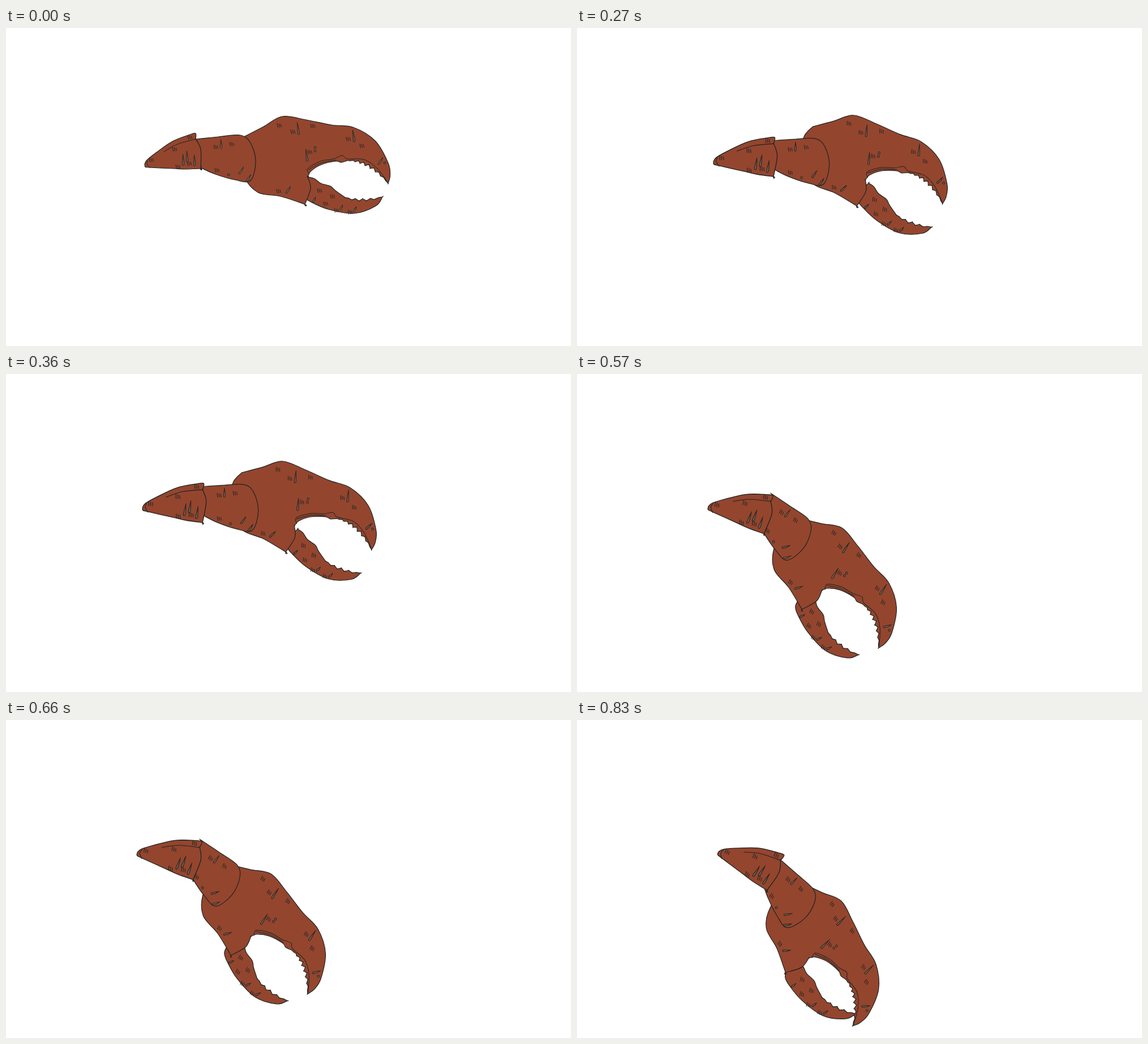
Write an HTML page with a canvas that moves like this. It is 998x561 px and loops after 900 ms.

```html
<!DOCTYPE html>
<html lang="en">
<head>
<meta charset="utf-8">
<title>Crab claw</title>
<style>
  html, body { margin: 0; width: 100%; height: 100%; overflow: hidden; background: #fff; }
  canvas { display: block; }
</style>
</head>
<body>
<canvas id="stage" width="998" height="561"></canvas>
<script>
const ctx = document.getElementById('stage').getContext('2d');
const SHELL = '#94452e', INK = '#1d2422', GLINT = '#84604a';
const LOOP = 900, FIRST_HOLD = 120, HOLD = 150, LAST_STEP = 5;

// Smooth path through points; a point given twice makes a corner.
function curve(points) {
  const path = new Path2D();
  const at = i => points[Math.max(0, Math.min(points.length - 1, i))];
  path.moveTo(...at(0));
  for (let i = 0; i < points.length - 1; i++) {
    const [a, b, c, d] = [at(i - 1), at(i), at(i + 1), at(i + 2)];
    path.bezierCurveTo(
      b[0] + (c[0] - a[0]) / 6, b[1] + (c[1] - a[1]) / 6,
      c[0] - (d[0] - b[0]) / 6, c[1] - (d[1] - b[1]) / 6, ...c);
  }
  return path;
}

const corner = (x, y) => [[x, y], [x, y]];

// Saw teeth along a quadratic arc from a to b, pointing into the mouth.
function teeth(a, control, b, count, depth) {
  const dx = b[0] - a[0], dy = b[1] - a[1], length = Math.hypot(dx, dy);
  const points = [];
  for (let i = 1; i < count * 2; i++) {
    const t = i / (count * 2);
    const out = (i % 2 ? depth : -depth / 3) * Math.sin(Math.PI * t);
    const on = k => (1 - t) ** 2 * a[k] + 2 * t * (1 - t) * control[k] + t * t * b[k];
    points.push(...corner(on(0) + out * dy / length, on(1) - out * dx / length));
  }
  return points;
}

// Short slanted strokes in a row.
function ticks([x, y]) {
  const path = new Path2D();
  for (const i of [-1, 0, 1]) {
    path.moveTo(x + i * 3 - 1, y - 3 + i / 2);
    path.lineTo(x + i * 3 + .5, y + 3 - i / 2);
  }
  return path;
}

// Thin drop, pointed at the top and round at the bottom.
function drop([x, y], size, lean) {
  const top = [x - lean, y - size / 2], bottom = [x + lean, y + size / 2];
  return curve([top, [x + 1, y], [bottom[0] + 1, bottom[1] - 2], bottom,
                [bottom[0] - 2, bottom[1] - 2], top, top]);
}

function ring([x, y]) {
  const path = new Path2D();
  path.arc(x, y, 1.8, 0, 7);
  return path;
}

// Back to front. Each pose is x, y and turn in degrees; the first pose is the drawn one.
const finger = {
  outline: [
    [522, 284], ...corner(534, 263), [545, 266], [556, 274], [573, 279], [582, 287],
    ...corner(599, 299), ...teeth([599, 299], [628, 310], [665, 298], 5, 3),
    ...corner(665, 298), [653, 314], [615, 327], [570, 320], [537, 306], [525, 297], [522, 284]],
  dropSize: 9, lean: -1.5,
  scars: [[593, 317], [617, 320]],
  drops: [[545, 303]],
  ticks: [[554, 287], [577, 297], [565, 310]],
  poses: [[595, 304, 0], [576, 310, 6.2], [558.5, 333, 20],
          [511.5, 400, 23.7], [437.5, 458, 37], [427, 492, 27]]
};

const palm = {
  outline: [
    [422, 191], [455, 174], [488, 156], [530, 162], [575, 171], [614, 175.5],
    [652, 199], [675, 238], [678.5, 260], ...corner(675, 274),
    ...teeth([675, 274], [642, 230], [603, 234], 8, 3.5),
    [603, 234], [592, 237], [583, 235], [557, 241], [538, 253], ...corner(533, 263),
    [538, 283], ...corner(528, 311), [485, 297], [445, 290], [420, 261], [410, 215], [422, 191]],
  lines: [
    [[536, 258], [533, 248], [556, 235], [578, 231], [594, 225], [603, 231],
     [632, 232], [655, 247], [674, 272]],
    [[534, 250], [557, 238], [583, 233]]],
  dropSize: 20, lean: 1.5,
  scars: [[516, 178], [614, 191]],
  drops: [[531, 225]],
  slants: [[499, 286], [662, 235]],
  ticks: [[483, 172], [542, 173], [629, 208], [537, 219], [482, 288]],
  rings: [[546, 211], [546, 217], [669, 238]],
  poses: [[567, 248, 0], [550, 242, 6.5], [546, 261, 12.6],
          [520, 336, 25.3], [468, 393, 40.8], [442, 438, 52.4]]
};

const middle = {
  outline: [
    ...corner(337, 196), [375, 192], [414, 189], [432, 203], [441, 235],
    [432, 269], [405, 268], [370, 258], ...corner(345, 247), [337, 196]],
  dropSize: 15, lean: .5,
  scars: [[380, 205]],
  slants: [[416, 252], [429, 265]],
  ticks: [[399, 205], [373, 251]],
  rings: [[393, 259]],
  poses: [[403.4, 237.4, 0], [411, 227, -10.3], [408, 243, 2.5],
          [386.4, 268, 24.2], [369, 286, 39.6], [375, 324, 47.1]]
};

const upper = {
  outline: [
    [245, 240], [249, 233], [265, 220], [294, 200], [325, 188], [335, 186], ...corner(335, 196),
    [344, 214], ...corner(344, 248), [318, 249], [296, 248], [253, 246], [246, 245], [245, 240]],
  lines: [
    [[279, 218], [303, 205], [335, 196]],
    [[250, 234], [249, 240], [255, 247]]],
  dropSize: 18, lean: .5,
  scars: [[333, 234]],
  drops: [[320, 227], [313, 233]],
  ticks: [[257, 233], [298, 214], [304, 245], [325, 193]],
  growth: 1.1,
  poses: [[312.5, 231, 0], [318.3, 225.3, 2.6], [316.3, 237.7, 10.1],
          [318.3, 246.3, 22.1], [305, 251.5, 21.7], [317.5, 265.5, 34.2]]
};

function paint(path, fill) {
  if (fill) {
    ctx.fillStyle = fill;
    ctx.fill(path);
  }
  ctx.stroke(path);
}

function drawPart(part, step) {
  const { lines = [], drops = [], slants = [], rings = [], scars, dropSize, lean } = part;
  const [pivotX, pivotY] = part.poses[0];
  const [x, y, degrees] = part.poses[step];
  const scale = step ? part.growth ?? 1 : 1;
  ctx.save();
  ctx.translate(x, y);
  ctx.rotate(degrees * Math.PI / 180);
  ctx.scale(scale, scale);
  ctx.translate(-pivotX, -pivotY);
  ctx.lineWidth = 1.2;
  paint(curve(part.outline), SHELL);
  ctx.lineWidth = 1;
  lines.forEach(line => paint(curve(line)));
  [...scars, ...drops].forEach(spot => paint(drop(spot, dropSize, lean), GLINT));
  slants.forEach(spot => paint(drop(spot, 12, -3), GLINT));
  // A scar is a drop with ticks at its side.
  const besideScars = scars.map(([sx, sy]) => [sx - 9, sy + 5]);
  [...part.ticks, ...besideScars].forEach(spot => paint(ticks(spot)));
  rings.forEach(spot => paint(ring(spot), GLINT));
  ctx.restore();
}

function draw(time) {
  const step = Math.min(LAST_STEP, Math.max(0, Math.floor((time - FIRST_HOLD) / HOLD) + 1));
  ctx.clearRect(0, 0, 998, 561);
  ctx.strokeStyle = INK;
  ctx.lineJoin = ctx.lineCap = 'round';
  [finger, palm, middle, upper].forEach(part => drawPart(part, step));
}

let start;
function tick(now) {
  start ??= now;
  draw(Math.max(0, now - start) % LOOP);
  requestAnimationFrame(tick);
}
draw(0);
requestAnimationFrame(tick);
</script>
</body>
</html>
```
